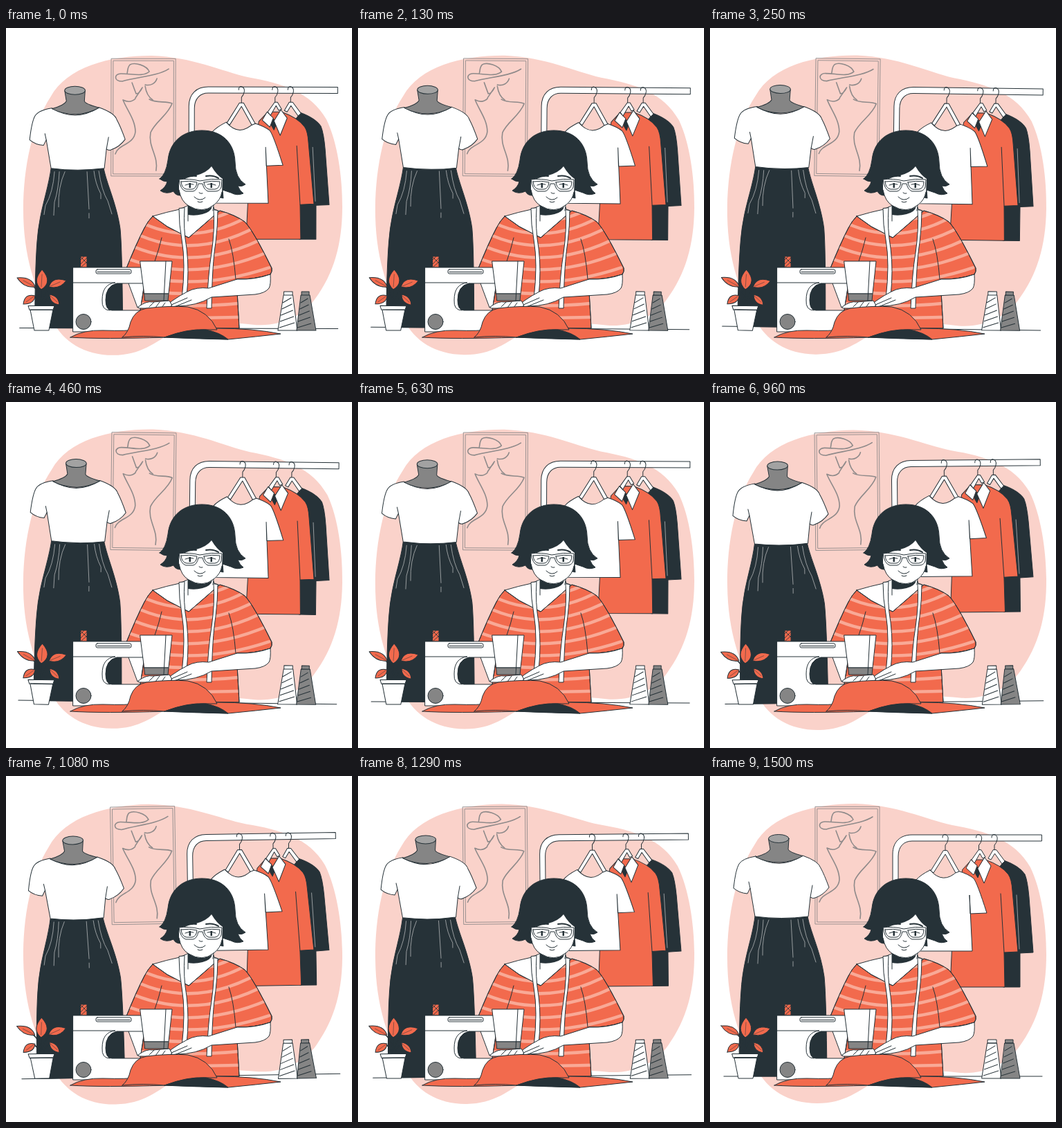
An HTML page for the animation above (1.54 s loop, 500 by 500 pixels).

```html
<!DOCTYPE html>
<html lang="en">
<head>
<meta charset="utf-8">
<title>Dressmaker</title>
<style>
html, body { margin: 0; width: 100%; height: 100%; overflow: hidden; background: #fff; }
svg { display: block; width: 100vw; height: 100vh; }
.ln { fill: none; }
.o { fill: #f26a4d; }
.d { fill: #263238; }
.w { fill: #fff; }
.g { fill: #858585; }
.none { stroke: none; }
.pale { fill: none; stroke: #a3a7a9; stroke-width: .9; }
</style>
</head>
<body>
<svg viewBox="0 0 500 500" stroke="#263238" stroke-width="1" stroke-linejoin="round" stroke-linecap="round">
  <defs>
    <path id="top" d="M212 272L233 287L264 303L309 264Q331 270 345 280Q357 292 384 347Q385 352 382 356Q357 364 333 363L337 434H190L203 350L174 347Q189 310 200 289Q205 279 212 272Z"/>
    <clipPath id="topClip"><use href="#top"/></clipPath>
  </defs>

  <!-- backdrop -->
  <g data-sway="254 258">
    <path class="none" fill="#fad2ca" d="M155 473C113 473 83 453 68 424C42 380 25 330 25 262C25 200 38 140 64 100C88 56 150 40 210 40C270 42 310 62 350 71C400 80 440 92 463 132C479 165 486 215 486 258C486 312 474 354 447 391C431 414 400 431 362 429C310 423 270 425 245 437C215 455 195 473 155 473Z"/>
  </g>

  <!-- wall picture -->
  <g data-sway="198.5 129" class="ln" stroke="#8f8a8a">
    <path stroke-width=".9" d="M152.3 44.3H245V214H152.3ZM155.2 47.3H242.2V211H155.2Z"/>
    <g stroke-width="1.600">
      <path d="M235 59C220 69 190 71 168 77C155 77 156 66 166 66C182 66 198 71 207 63C203 54 186 49 179 53C175 57 176 62 175 65"/>
      <path d="M182 79Q186 90 188 95Q193 95 197 86M218 73C216 80 209 84 201 82M197 86L187 101M201 84Q203 98 212 104"/>
      <path d="M187 102C180 109 173 106 169 104C175 119 187 133 187 150C185 169 162 168 158 182M207 103C217 109 231 105 240 109C234 126 216 135 209 151C205 172 221 185 217 206"/>
    </g>
  </g>

  <!-- rack, dress form, table edge -->
  <g data-sway="254 259">
    <path class="w" d="M479 85H292C275 85 264 95 264 113V240H272V116C272 102 280 94 292 94H479Z"/>
    <g id="hooks"></g>

    <path class="d" d="M412 135Q421 131 425 122Q447 130 455 142Q459 152 461 175L467 255L448 256V305H424Z"/>
    <path class="w" d="M409 107L402 119L406 121L411.500 112L422 127L426 123L414 107Z"/>
    <path class="pale" d="M443 172L447 250"/>
    <path class="o" d="M365 135L378 121H398Q421 129 431 142Q436 149 437 166L445 254L425 255L426 305H347L350 240Z"/>
    <path class="ln" d="M420 170L425 255"/>
    <path class="d" d="M386 131L391 137L387 147L383 140Z"/>
    <path class="w" d="M377 121L370 133L381 143L386 130ZM397 118L406 130L396 155L387 134Z"/>
    <path class="w" d="M388 107L378 121L382 126L390 112L394 119L398 117L392 107Z"/>

    <path class="w" d="M318 136Q337 158 358 137Q374 142 381 148Q386 154 400 198L376 199L375 172L379 253H302L298 150Q304 143 318 136Z"/>
    <path class="w" d="M337 108L319 137L323 140L340 113L355 140L360 138L343 108Z"/>

    <path class="d" d="M65 203Q103 208 141 203C146 228 160 254 165 290Q168 320 169 434H42Q42 350 45 310C48 264 61 236 65 203Z"/>
    <path class="pale" d="M70 208Q68 238 57 257L55 270M77 208Q76 233 70 252L69 271M85 208Q75 230 76 259M117 208L120 262M120 268V275M127 207Q129 225 137 240V247M134 207Q138 235 147 250L153 269"/>
    <path class="w" d="M66 116Q47 119 42 127Q37 135 34 162Q42 169 54 170L58 162L65 203Q103 208 142 203L145 175Q149 178 152 176Q164 172 172 161Q165 142 160 133Q157 123 134 115Q100 137 66 116Z"/>
    <path class="ln" d="M58 162L56 153M145 175L148 158"/>
    <path class="g" d="M84.5 91L87 106Q84 112 66 117Q81 125 101 125Q120 124 134 115.500Q114 110 113 106L114 91Z"/>
    <ellipse cx="99.300" cy="90.500" rx="14.800" ry="6" fill="#a2a2a2"/>
    <path d="M20 434H480"/>
  </g>

  <!-- plant -->
  <g data-sway="51.500 393">
    <path class="ln" stroke-width="1.500" d="M51 402V372M51 402Q50 380 37 372M52 402Q53 382 66 373M50 402Q46 390 38 387M53 402Q57 389 66 386"/>
    <path class="o" d="M52 349Q68 367 51 378Q37 366 52 349ZM16 361Q37 359 42 374Q26 376 16 361ZM87 365Q78 378 62 374Q67 358 87 365ZM25 399Q27 383 42 387Q41 399 25 399ZM77 400Q63 398 63 385Q76 387 77 400Z"/>
    <path class="ln" stroke-width=".5" d="M52 356L51 374M25 365L40 373M78 367L64 373M29 396L40 388M74 396L64 387"/>
    <path class="w" d="M35 407L41 437H62L68 407ZM32 401.500H70L68 407.500H34Z"/>
  </g>

  <!-- dressmaker -->
  <path class="w" d="M212 272Q232 266 251 262L264 256H299L301 262L312 266L270 312L230 292Z"/>
  <path class="w" d="M174 347L177 369L190 404L215 406L203 350Z"/>
  <use href="#top" class="o"/>
  <g id="stripes" class="ln" clip-path="url(#topClip)" stroke="#f9a996" stroke-width="4.500"></g>
  <use href="#top" class="ln"/>
  <path class="ln" d="M322 305Q329 325 332 363M225 303Q221 320 215 337"/>
  <path class="w" d="M250 261Q250 285 254 306Q260 340 254 391L261 388Q265 350 261 318Q256 290 258 260Z"/>
  <path class="w" d="M300 263Q302 290 297 325Q292 355 290 405H297Q298 340 303 310Q306 285 306 264Z"/>
  <path class="w" d="M382 356Q383 371 380 376Q375 383 360 385L297 389Q275 402 246 402L232 404L239 395Q252 386 262 381Q275 374 293 376L334 363Q360 364 382 356Z"/>
  <path class="w" d="M191 403Q203 394 212 396L236 394L240 401L233 405H193Z"/>
  <path class="ln" d="M207 403L214 396M216 404L222 396M225 404L230 397M239 400L262 390M246 402L268 393"/>

  <path class="d" d="M222 218Q231 212 234 191C237 162 258 148 283 148C312 148 330 166 331 193Q331 217 346 226Q341 230 335 228Q338 236 343 239Q334 243 325 238L313 234L314 246Q306 245 302 240L252 242Q245 242 242 236Q231 241 223 235Q231 230 233 222Q227 222 222 218Z"/>
  <path class="w none" d="M250 221Q258 216 275 213Q290 209 297 200Q304 212 313 218L312 238Q309 250 300 257L299 268L263 271V256Q253 249 250 234Z"/>
  <path class="d none" d="M263 256Q281 269 298 258Q296 266 284 269Q273 272 263 270Z"/>
  <path class="ln" d="M263 257V279M250 234Q253 251 264 257Q284 269 300 256Q310 249 312 237M300 256L299 264"/>
  <path class="ln" stroke-width="2" d="M258 217Q266 213 275 214M289 214Q299 212 307 217"/>
  <g class="w">
    <path d="M250 219Q264 217 280 221Q297 217 312 219L311 230Q309 236 302 236H292Q286 234 284 225H278Q276 235 270 236H260Q252 234 250 219Z"/>
    <path d="M253 222Q265 220 276 223Q275 232 269 233H261Q254 232 253 222ZM286 223Q297 220 309 222Q309 232 302 233H293Q287 231 286 223Z"/>
  </g>
  <path class="ln" d="M259 227Q265 224 271 226M291 226Q297 224 303 227"/>
  <path class="d none" d="M264.500 224H267V231H264.500ZM295.500 224H298V231H295.500Z"/>
  <path class="ln" d="M279 238Q281 240 284 239M272 244Q280 252 288 245M277 251Q280 253 284 251"/>

  <!-- machine -->
  <path class="o" d="M108 330H117V346H108Z"/>
  <path class="ln" stroke-width=".8" d="M108 335L113 330M108 341L117 332M109 345L117 338M108 331L117 340"/>
  <path class="w" fill-rule="evenodd" d="M97 346H198L200 369H160Q144 373 144 393Q144 408 153 408H205V439H97Z"/>
  <path class="ln" d="M97 368H158Q139 370 139 393Q138 408 150 408"/>
  <rect class="w" x="130" y="349" width="51" height="6" rx="2"/>
  <path class="ln" d="M132 352.500H179"/>
  <circle class="g" cx="112" cy="424.500" r="11"/>
  <path class="w" d="M194 337H240L235 384H200Z"/>
  <path class="g" d="M200 384H235L234 394H201Z"/>
  <path class="ln" d="M231 337L228 394"/>

  <!-- fabric -->
  <path class="o" d="M93 447Q112 436 140 437Q176 438 190 436L305 434Q357 434 397 442Q362 446 321 450Q270 448 229 447Q140 450 93 447Z"/>
  <path class="o" d="M168 447Q177 440 180 425Q186 408 203 405Q235 401 263 403Q293 409 305 436Q264 434 229 447Q198 444 168 447Z"/>
  <path class="d" d="M229 447Q263 434 289 436Q309 440 321 450Q270 449 229 447Z"/>

  <!-- thread -->
  <g data-sway="420.500 409">
    <path class="w" d="M401.500 381H414V386H401.500ZM401 386H414.500L421 437H393Z"/>
    <path class="g" d="M427 381H438V386H427ZM426 386H439L448 437H420Z"/>
    <g id="thread"></g>
  </g>
</svg>
<script>
const $ = id => document.getElementById(id);
const add = (id, d) => $(id).insertAdjacentHTML('beforeend', `<path d="${d}"/>`);

for (const x of [340, 388.5, 411])
  add('hooks', `M${x - 4} 89Q${x - 4} 84 ${x} 84.500Q${x + 5} 86 ${x + 4} 92Q${x + 3} 97 ${x} 100V108" fill="none`);

// Stripes sag across the shoulders and flatten towards the hem
for (let i = -1; i < 9; i++) {
  const y = 283 + i * 17, sag = 38 - i * 4.5;
  add('stripes', `M170 ${y - sag}Q270 ${y + sag} 380 ${y - sag * 1.4}`);
}

for (let i = 0; i < 5; i++) {
  const y = 397 + i * 9, s = i * 1.2;
  add('thread', `M${400 - s} ${y}L${412 + s} ${y - 7}`);
  add('thread', `M${426 - s} ${y}L${436 + s} ${y - 6}`);
}

const LOOP = 1540, STEPS = 37;
const parts = [...document.querySelectorAll('[data-sway]')];

// Linear swing in degrees: 0, 1, -1, 0
const swing = p => p < .25 ? 4 * p : p < .75 ? 2 - 4 * p : 4 * p - 4;

function draw(now) {
  const step = Math.floor(now % LOOP / LOOP * STEPS + .1) + 1;
  const angle = swing(step % STEPS / STEPS);
  for (const el of parts) el.setAttribute('transform', `rotate(${angle} ${el.dataset.sway})`);
}

const start = performance.now();
function tick() {
  draw(performance.now() - start);
  requestAnimationFrame(tick);
}
tick();
</script>
</body>
</html>
```
